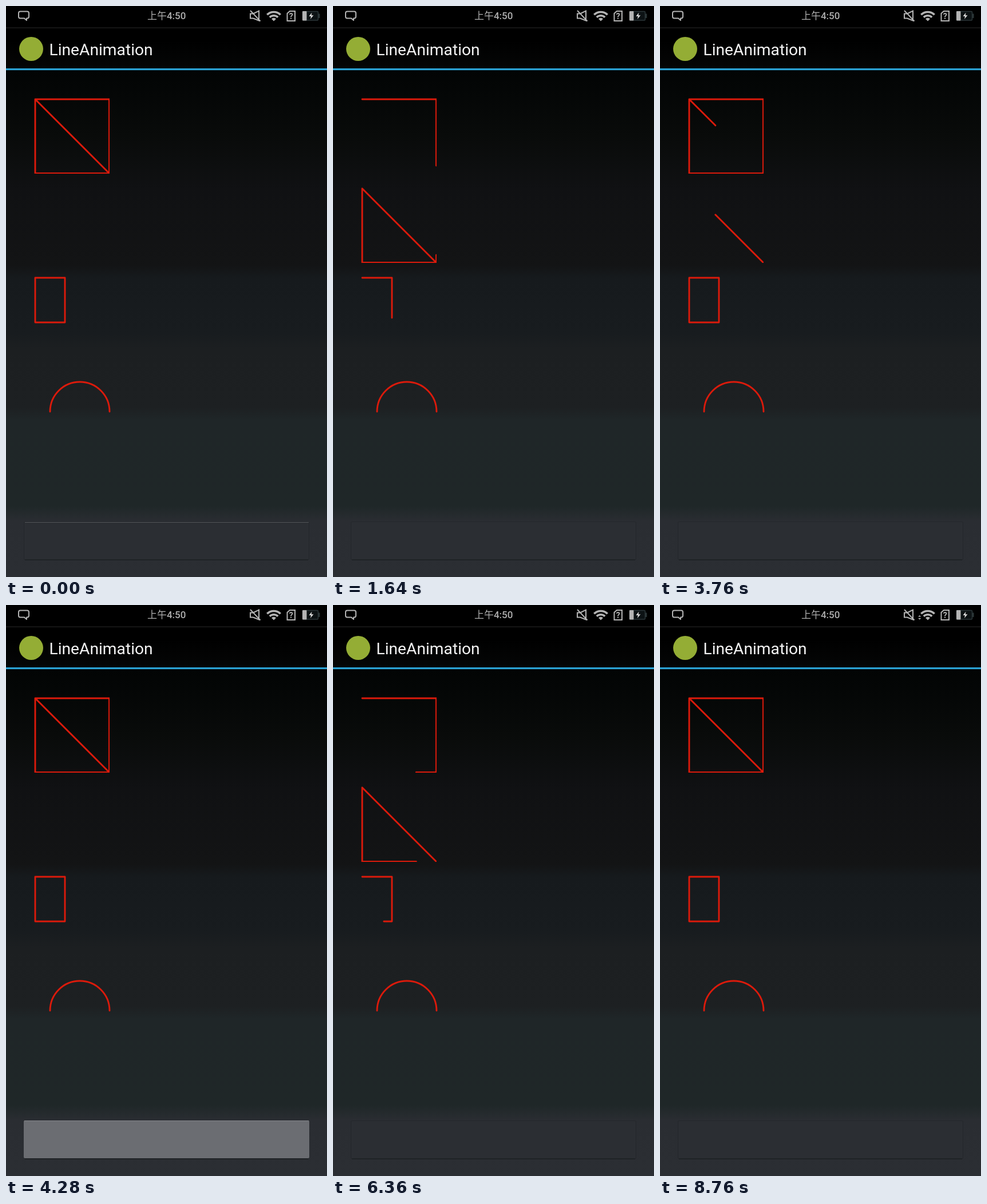
Write an HTML page that moves like this. It is 561 px wide and 998 px high and loops after 8800 ms.

```html
<!DOCTYPE html>
<html lang="zh">
<head>
<meta charset="utf-8">
<title>LineAnimation</title>
<style>
  html, body { margin: 0; width: 100%; height: 100%; overflow: hidden; background: #000; }
  svg { display: block; width: 100vw; height: 100vh; }
  .line { fill: none; stroke: #dc1a0b; stroke-width: 2.9; stroke-linecap: round; stroke-linejoin: round; }
  .icon { fill: none; stroke: #b4b4b4; stroke-width: 2; }
  .solid { fill: #b4b4b4; stroke: none; }
  .clock { font: 500 17px Roboto, "Noto Sans CJK SC", "Noto Sans CJK JP", sans-serif; fill: #b0b0b0; }
  .title { font: 28.2px Roboto, sans-serif; fill: #f4f4f4; }
  .mark { font: bold 14px Roboto, sans-serif; fill: #b4b4b4; }
</style>
</head>
<body>
<svg viewBox="0 0 561 998" preserveAspectRatio="none">
  <defs>
    <linearGradient id="page" gradientUnits="userSpaceOnUse" x1="0" y1="112" x2="0" y2="998">
      <stop offset="0" stop-color="#020404"/>
      <stop offset=".13" stop-color="#090b0a"/>
      <stop offset=".235" stop-color="#101113"/>
      <stop offset=".385" stop-color="#131415"/>
      <stop offset=".41" stop-color="#161a1d"/>
      <stop offset=".52" stop-color="#181c1f"/>
      <stop offset=".55" stop-color="#1c1f21"/>
      <stop offset=".665" stop-color="#1d2022"/>
      <stop offset=".69" stop-color="#1f2628"/>
      <stop offset=".86" stop-color="#1f2728"/>
      <stop offset=".89" stop-color="#2a2d32"/>
      <stop offset="1" stop-color="#2b2e33"/>
    </linearGradient>
    <linearGradient id="bar" x1="0" y1="0" x2="0" y2="1">
      <stop offset=".3" stop-color="#000"/>
      <stop offset="1" stop-color="#050606"/>
    </linearGradient>
    <clipPath id="upper"><rect x="40" y="150" width="141" height="143"/></clipPath>
    <clipPath id="lower"><rect x="40" y="306" width="141" height="143"/></clipPath>
  </defs>

  <rect width="561" height="998"/>
  <rect y="112" width="561" height="886" fill="url(#page)"/>
  <rect y="39" width="561" height="70" fill="url(#bar)"/>
  <rect y="37.5" width="561" height="1.2" fill="#242424"/>
  <rect y="109" width="561" height="3.2" fill="#2ba3d6"/>

  <!-- status bar -->
  <path class="icon" stroke-width="1.8" stroke-linejoin="round"
    d="M25 9.5h12q3 0 3 3v6q0 3-3 3h-1v3.5l-4-3.5h-7q-3 0-3-3v-6q0-3 3-3z"/>
  <text class="clock" x="280.7" y="23" text-anchor="middle">上午4:50</text>
  <path class="icon" d="M427 13.5h5l10-5v17l-10-4h-5zM427 8l17.500 18.500"/>
  <path id="traffic" class="solid" d="M451 20.500l2.700-2.500 2.700 2.500zM451 23l2.700 2.500 2.700-2.500z"/>
  <path class="icon" stroke-width="3.600" style="stroke-width:3.600"
    d="M456.300 15.300a16.500 16.500 0 0 1 23.400 0M460.800 19.800a10.200 10.200 0 0 1 14.400 0"/>
  <path class="solid" d="M468 26.500l-4-4a5.700 5.700 0 0 1 8 0z"/>
  <path class="icon" d="M496 9h9v17h-13.500v-13z"/>
  <text class="mark" x="498.300" y="23" text-anchor="middle">?</text>
  <rect x="518.500" y="9.500" width="27" height="15.500" rx="1.500" fill="#0c1214" stroke="#2b3638" stroke-width="1.500"/>
  <rect x="546" y="13.500" width="2.500" height="7.500" fill="#2b3638"/>
  <rect class="solid" x="518" y="9" width="7.500" height="16.500" rx="1"/>
  <path fill="#d8d8d8" d="M534.500 11.500l-5 6.500h3.500l-1 5 5.500-6.700h-3.700z"/>

  <!-- title bar -->
  <circle cx="44" cy="75" r="21" fill="#94ad35"/>
  <text class="title" x="75.500" y="85.500">LineAnimation</text>

  <!-- button -->
  <rect x="31.500" y="901.500" width="498" height="66.500" rx="2" fill="#2b2e33" stroke="#24272b"/>
  <path d="M33 968h495" stroke="#1d2023" stroke-width="1.300"/>
  <path id="glint" d="M33 902.500h496" stroke="#54575a"/>
  <g id="press">
    <rect x="31" y="901" width="499" height="66" rx="2" fill="#6b6d72"/>
    <path d="M32 901.500h497" stroke="#86888c"/>
  </g>

  <g class="line">
    <g clip-path="url(#upper)"><path id="drawn"/></g>
    <g clip-path="url(#lower)"><path id="erased"/></g>
    <path id="box"/>
    <path id="arc"/>
  </g>
</svg>
<script>
  const LOOP = 8800, STEP = 40;
  const runs = [{ start: 187, leg: 811 }, { start: 4488, leg: 797 }];
  const presses = [[40, 200], [4240, 4480]];
  const el = id => document.getElementById(id);

  const square = y => [[51, y], [180.5, y], [180.5, y + 129.5], [51, y + 129.5], [51, y], [180.5, y + 129.5]];
  const upper = square(163), lower = square(319);
  const rect = [[51, 475], [103, 475], [103, 553], [51, 553], [51, 475]];

  const ease = u => (1 - Math.cos(Math.PI * u)) / 2;
  const toPath = pts => pts.length > 1 ? "M" + pts.map(p => p.join(" ")).join("L") : "";

  // p counts finished legs plus the share of the current one
  function tip(pts, p) {
    const i = Math.floor(p), f = p - i, [a, b] = [pts[i], pts[i + 1]];
    return a.map((v, k) => v + (b[k] - v) * f);
  }
  function before(pts, p) {
    if (p >= pts.length - 1) return toPath(pts);
    return toPath([...pts.slice(0, Math.floor(p) + 1), tip(pts, p)]);
  }
  function after(pts, p) {
    if (p >= pts.length - 1) return "";
    return toPath([tip(pts, p), ...pts.slice(Math.floor(p) + 1)]);
  }
  function arcPath(share) {
    const a = Math.PI * Math.min(1, share);
    return `M77 709A52 52 0 0 1 ${129 - 52 * Math.cos(a)} ${709 - 52 * Math.sin(a)}`;
  }

  function progress(t) {
    const run = runs.filter(r => t >= r.start).pop();
    if (!run) return 5;
    const legs = (t - run.start) / run.leg;
    if (legs >= 5) return 5;
    const i = Math.floor(legs);
    return i + ease(legs - i);
  }

  const show = (id, on) => el(id).setAttribute("visibility", on ? "visible" : "hidden");

  function draw() {
    const now = performance.now() % LOOP;
    const t = Math.floor(now / STEP) * STEP;
    const p = progress(t);
    el("drawn").setAttribute("d", before(upper, p));
    el("erased").setAttribute("d", after(lower, p));
    el("box").setAttribute("d", before(rect, p));
    el("arc").setAttribute("d", arcPath(p));
    show("press", presses.some(([a, b]) => t >= a && t < b));
    show("glint", t < 1000);
    show("traffic", t >= 8560);
    requestAnimationFrame(draw);
  }
  draw();
</script>
</body>
</html>
```
